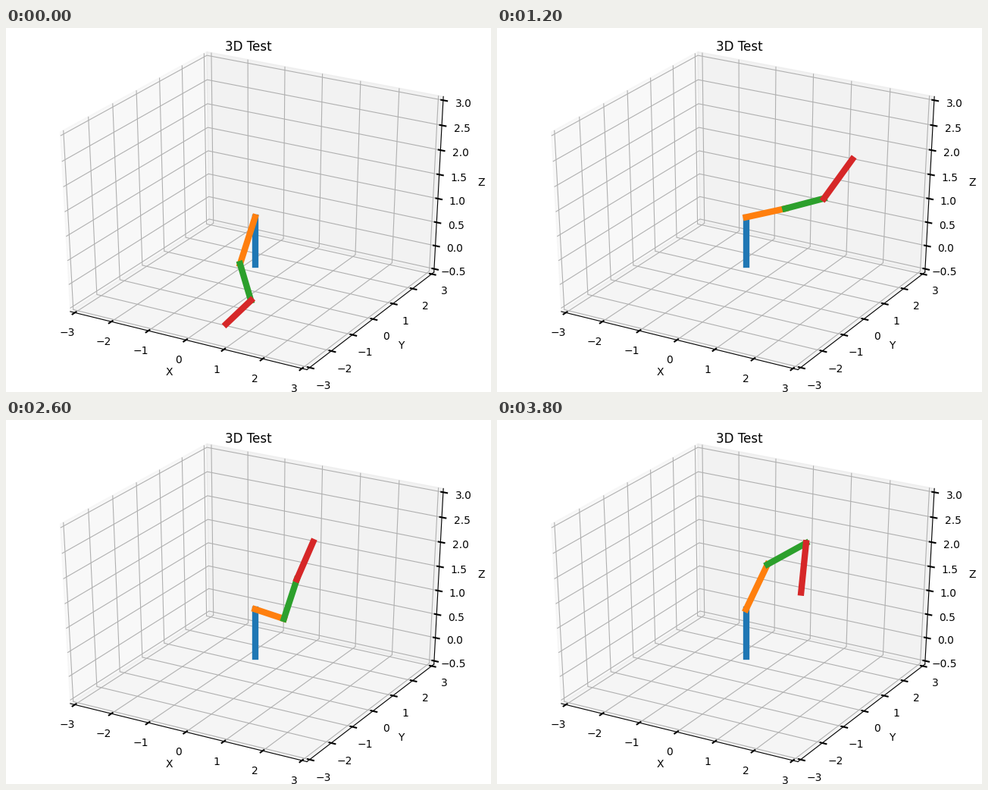
Write a matplotlib script that moves like this. It is 640 px wide and 480 px high and loops after 4000 ms.

```python
import numpy as np
import matplotlib.pyplot as plt
from matplotlib.animation import FuncAnimation

FRAMES, INTERVAL = 20, 200
ELEV, AZIM, DIST = np.radians(30), np.radians(-60), 10

LIMITS = np.array([[-3, 3], [-3, 3], [-0.5, 3]])
SPAN = LIMITS[:, 1] - LIMITS[:, 0]
STEP = SPAN / 12
LOW = LIMITS[:, 0] - STEP / 4
HIGH = LIMITS[:, 1] + STEP / 4
CENTER = (LOW + HIGH) / 2
BACK = np.array([LOW[0], HIGH[1], LOW[2]])   # corner where the three panes meet
FRONT = LOW + HIGH - BACK

# Camera basis
RIGHT = np.array([-np.sin(AZIM), np.cos(AZIM), 0])
UP = np.array([-np.cos(AZIM) * np.sin(ELEV), -np.sin(AZIM) * np.sin(ELEV), np.cos(ELEV)])
TOWARD = np.array([np.cos(AZIM) * np.cos(ELEV), np.sin(AZIM) * np.cos(ELEV), np.sin(ELEV)])

# Frame, base yaw and joint angles (degrees); each joint is relative to the link before it
POSES = np.array([
    [0, 84, -126, 61, -103],
    [3, 65, -67, 36.5, 13.5],
    [6, 55, 2, 2, 41],
    [9, -2, 12.5, 37, 73.5],
    [13, -19, 3.5, 61.5, -6],
    [17, 38, 19.6, 3.9, -81],
    [19, 52, 58.3, -39.9, -114.4],
])
KEYS, ANGLES = POSES[:, 0], POSES[:, 1:]
SLOPES = np.gradient(ANGLES, KEYS, axis=0)


def project(points):
    p = (np.atleast_2d(points) - LIMITS[:, 0]) / SPAN - 0.5
    w = DIST - p @ TOWARD
    return p @ RIGHT / w, p @ UP / w


def with_coord(point, axis, value):
    moved = np.array(point, float)
    moved[axis] = value
    return moved


def push_out(point, axis, amount):
    """Move a point away from the box centre, except along one axis."""
    shift = np.sign(point - CENTER) * amount * STEP
    shift[axis] = 0
    return point + shift


def put_text(point, text, va):
    x, y = project(point)
    ax.text(x[0], y[0], text, size=10, ha="center", va=va)


def draw_pane(axis, gray):
    a, b = [k for k in range(3) if k != axis]
    p = with_coord(BACK, a, FRONT[a])
    q = with_coord(BACK, b, FRONT[b])
    corners = [BACK, p, with_coord(p, b, FRONT[b]), q]
    ax.fill(*project(corners), fc=str(gray), ec=str(gray), alpha=0.5, lw=1)


def draw_axis(axis, name, edge, tick_dir, ticks, fmt):
    ends = [with_coord(edge, axis, LOW[axis]), with_coord(edge, axis, HIGH[axis])]
    ax.plot(*project(ends), color="k", lw=0.8)

    points_to_steps = 48 / (72 * fig.get_size_inches().sum())
    middle = with_coord(edge, axis, CENTER[axis])
    put_text(push_out(middle, axis, 25 * points_to_steps), name, "center")

    a, b = (axis + 1) % 3, (axis + 2) % 3
    for value in ticks:
        corner = with_coord(BACK, axis, value)
        line = [with_coord(corner, a, FRONT[a]), corner, with_coord(corner, b, FRONT[b])]
        ax.plot(*project(line), color="#b0b0b0", lw=0.8, solid_capstyle="butt")

    for value in ticks:
        at = with_coord(edge, axis, value)
        out = np.sign(at - CENTER)[tick_dir] * STEP[tick_dir]
        tick = [with_coord(at, tick_dir, at[tick_dir] + k * out) for k in (-0.1, 0.2)]
        ax.plot(*project(tick), color="k", lw=1.5)
        label = format(value, fmt).replace("-", "\u2212")
        put_text(push_out(at, axis, 11.5 * points_to_steps), label, "top")


def joint_angles(t):
    """Cubic Hermite blend between the poses."""
    k = int(np.clip(np.searchsorted(KEYS, t, side="right") - 1, 0, len(KEYS) - 2))
    h = KEYS[k + 1] - KEYS[k]
    s = (t - KEYS[k]) / h
    return ((1 + 2 * s) * (1 - s) ** 2 * ANGLES[k] + s * (1 - s) ** 2 * h * SLOPES[k]
            + s * s * (3 - 2 * s) * ANGLES[k + 1] + s * s * (s - 1) * h * SLOPES[k + 1])


def arm_points(t):
    yaw, *joints = np.radians(joint_angles(t))
    points = [np.zeros(3), np.array([0, 0, 1.0])]
    for pitch in np.cumsum(joints):
        reach = np.cos(pitch)
        points.append(points[-1] + [reach * np.cos(yaw), reach * np.sin(yaw), np.sin(pitch)])
    return np.array(points)


def update(i):
    points = arm_points(i)
    for k, link in enumerate(links):
        link.set_data(*project(points[k:k + 2]))
    return links


fig = plt.figure(figsize=(6.4, 4.8), dpi=100, facecolor="white")
ax = fig.add_axes([0, 0, 1, 1])
ax.set_axis_off()

for axis, gray in enumerate((0.95, 0.9, 0.925)):
    draw_pane(axis, gray)
whole = range(-3, 4)
draw_axis(0, "X", LOW, 1, whole, "d")
draw_axis(1, "Y", [HIGH[0], LOW[1], LOW[2]], 0, whole, "d")
draw_axis(2, "Z", [HIGH[0], HIGH[1], LOW[2]], 0, np.arange(-0.5, 3.1, 0.5), ".1f")
fig.text(0.5, 0.92 + 6 / 72 / 4.8, "3D Test", size=12, ha="center", va="baseline")

links = [ax.plot([], [], color=f"C{k}", lw=6, zorder=5)[0] for k in range(4)]
ax.set_xlim(-0.95 / DIST, 0.9 / DIST)
ax.set_ylim(-0.95 / DIST, 0.9 / DIST)

anim = FuncAnimation(fig, update, frames=FRAMES, interval=INTERVAL,
                     repeat=True, repeat_delay=0, blit=False)
plt.show()
```
